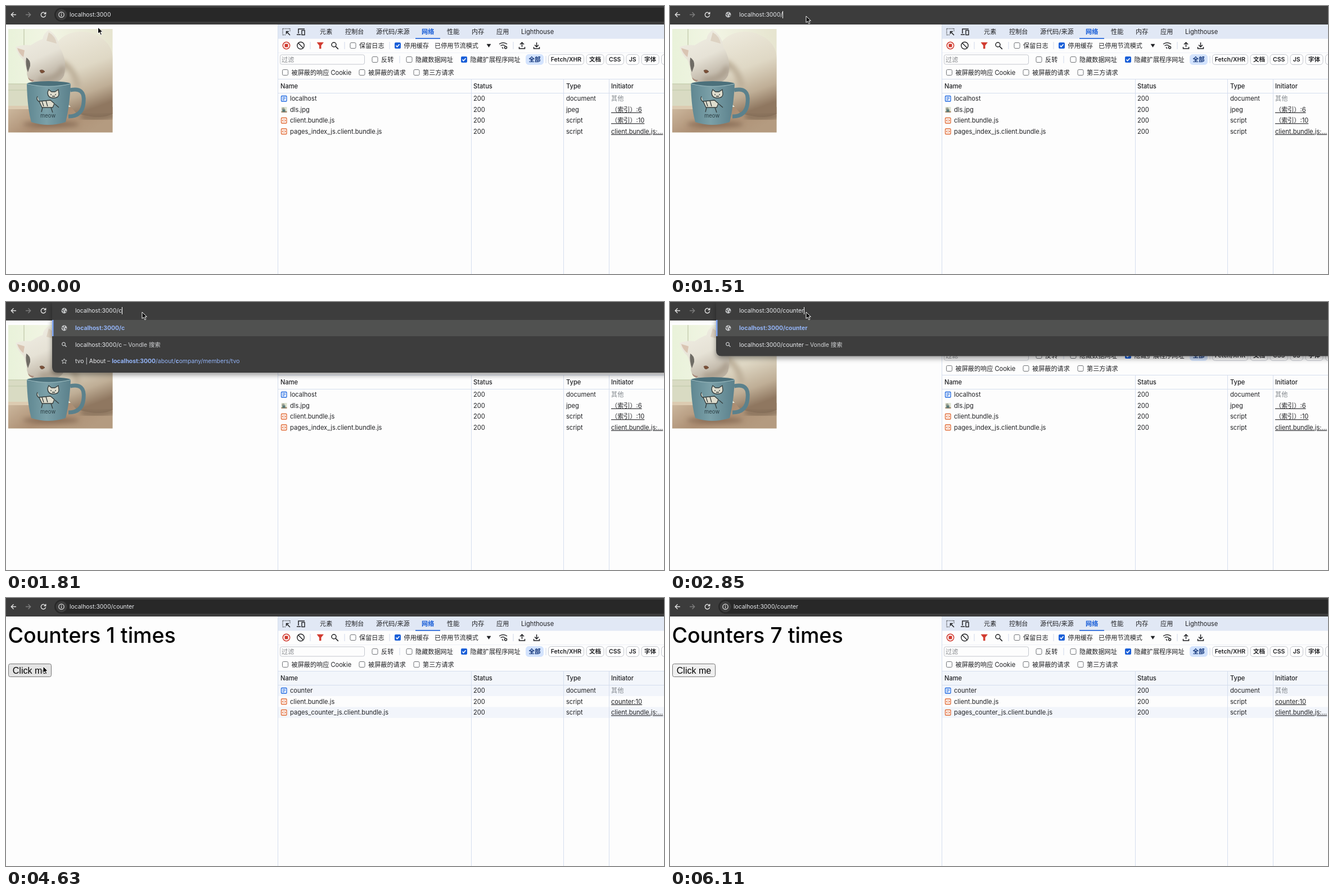
An HTML page for the animation above (6.69 s loop, 1170 px wide and 478 px high).

```html
<!DOCTYPE html>
<html lang="zh-CN">
<head>
<meta charset="utf-8">
<title>Counter page demo</title>
<style>
html, body { margin: 0; width: 100%; height: 100%; overflow: hidden; background: #fdfdfd; }
svg { display: block; width: 100%; height: 100%; }
text { font-family: Inter, "Noto Sans CJK SC", "Noto Sans CJK", "Noto Sans CJK JP", sans-serif; white-space: pre; }
</style>
</head>
<body>
<svg id="stage" viewBox="0 0 1170 478">
  <defs>
    <filter id="shadow" x="-5%" y="-20%" width="110%" height="150%">
      <feDropShadow dx="0" dy="4" stdDeviation="5" flood-opacity=".4"/>
    </filter>
    <filter id="soft" x="-50%" y="-50%" width="200%" height="200%"><feGaussianBlur stdDeviation="4"/></filter>
    <linearGradient id="wall"><stop stop-color="#e9f2da"/><stop offset=".4" stop-color="#f2f5e4"/><stop offset="1" stop-color="#e6e4cf"/></linearGradient>
    <linearGradient id="fur" x2=".25" y2="1"><stop stop-color="#efecdf"/><stop offset=".5" stop-color="#dfd8c5"/><stop offset=".8" stop-color="#bfae96"/><stop offset="1" stop-color="#8f7760"/></linearGradient>
    <linearGradient id="face" x2=".4" y2="1"><stop stop-color="#f2f0e6"/><stop offset=".6" stop-color="#e6e2d6"/><stop offset="1" stop-color="#bdb3a4"/></linearGradient>
    <linearGradient id="table" x2="1" y2=".4"><stop stop-color="#cdb99f"/><stop offset=".5" stop-color="#ab8d72"/><stop offset="1" stop-color="#b49b80"/></linearGradient>
    <linearGradient id="mug"><stop stop-color="#5f8791"/><stop offset=".45" stop-color="#7ba0a8"/><stop offset="1" stop-color="#5a808b"/></linearGradient>
    <clipPath id="photoFrame"><rect x="4" y="41" width="185.5" height="184.5"/></clipPath>
  </defs>
  <g id="tools"></g>
  <g id="scene"></g>
</svg>
<script>
const LOOP = 6690, HOST = 'localhost:3000', UI_SIZE = 11.13;
const INK = '#202124', GREY = '#5f6368', BLUE = '#1a5fd8', RED = '#d13a2f', LINE = '#d5deee', LINK = '#93b4f7';
const byId = id => document.getElementById(id);

const rect = (x, y, w, h, fill, extra = '') =>
  `<rect x="${x}" y="${y}" width="${w}" height="${h}" fill="${fill}" ${extra}/>`;
const circle = (x, y, r, fill, extra = '') => `<circle cx="${x}" cy="${y}" r="${r}" fill="${fill}" ${extra}/>`;
const path = (d, stroke, width = 1.3, fill = 'none', extra = '') =>
  `<path d="${d}" stroke="${stroke}" stroke-width="${width}" fill="${fill}" ${extra}/>`;
const shape = (d, fill, extra) => path(d, 'none', 0, fill, extra);
const at = (x, y, content) => `<g transform="translate(${x} ${y})">${content}</g>`;
// Text is placed by its left edge and vertical centre.
const text = (x, cy, content, fill = INK, size = UI_SIZE, extra = '') =>
  `<text x="${x}" y="${cy + size * .365}" fill="${fill}" font-size="${size}" ${extra}>${content}</text>`;
const span = (content, fill, weight = 400) => `<tspan fill="${fill}" font-weight="${weight}">${content}</tspan>`;

function checkbox(x, y, label, checked) {
  const box = checked
    ? rect(x - 5.5, y - 5.5, 11, 11, BLUE, 'rx="2"') + path(`M${x - 3} ${y}l2 2.3 4-4.6`, '#fff', 1.5)
    : rect(x - 5, y - 5, 10, 10, '#fff', 'rx="2" stroke="#6f7276"');
  return box + text(x + 11, y, label);
}

function chip(x, width, label, active) {
  return rect(x, 86.5, width, 18, active ? '#d3e3fd' : '#fdfdfd', `rx="5" stroke="${active ? '#d3e3fd' : '#c4c7ce'}"`) +
    text(x + width / 2, 95.5, label, active ? '#0b2f75' : INK, 10.5, 'font-weight="600" text-anchor="middle"');
}

function toolbarIcons() {
  const separators = [[541, 70], [602, 70], [682, 70], [902, 70], [700, 95], [960, 95]]
    .map(([x, y]) => path(`M${x} ${y - 6}v13`, '#cfd8ea', 1)).join('');
  return separators +
    // inspect and device mode
    path('M492 40.5h13M492 40.5v11M505 40v5M492 51.5h5', GREY, 1.4, 'none', 'stroke-dasharray="2 1.3"') +
    path('M505 52l-6-6M498.5 50v-4.5h4.5', INK, 1.5) +
    path('M520 49v-8h11M517 51h7', INK, 1.5) + rect(526, 43.5, 5, 8, 'none', `stroke="${INK}" stroke-width="1.4"`) +
    // record, clear, filter, search
    circle(498.5, 70.5, 6.2, 'none', `stroke="${RED}" stroke-width="1.5"`) + rect(495.5, 67.5, 6, 6, RED, 'rx="1"') +
    circle(524, 70.5, 6.2, 'none', `stroke="${INK}" stroke-width="1.4"`) + path('M519.8 66.3l8.5 8.5', INK, 1.4) +
    path('M553 65h11.5l-4.3 5.6v5.4h-3v-5.4z', RED, .5, RED) +
    circle(583, 69, 4, 'none', `stroke="${INK}" stroke-width="1.5"`) + path('M586 72l4.8 4.8', INK, 1.7) +
    // throttling menu, network conditions, import, export
    path('M855 68h7l-3.5 5.5z', INK, .5, INK) +
    path('M877 68q7-5 14 0M879.5 71q4-3 8 0M882 73.5l2 2.5', INK, 1.4) + circle(888.5, 74, 2, 'none', `stroke="${INK}" stroke-width="1.5"`) +
    path('M917.5 73v-8M914 68.5l3.5-3.5 3.5 3.5M912.5 73v3h10v-3', INK, 1.5) +
    path('M943.5 65v8M940 69.5l3.5 3.5 3.5-3.5M938.5 73v3h10v-3', INK, 1.5);
}

function devtools() {
  const tabs = [[558, '元素'], [603, '控制台'], [658, '源代码/来源'], [784, '性能'], [828, '内存'], [872, '应用'], [916, 'Lighthouse']];
  return rect(483, 33, 687, 445, '#fdfdfd') + rect(484, 33, 686, 25.5, '#e1e8f5') +
    tabs.map(([x, label]) => text(x, 45.5, label)).join('') +
    text(739, 45.5, '网络', BLUE, UI_SIZE, 'font-weight="600"') + rect(728, 57, 44, 1.6, BLUE) +
    path('M484 83.5h686', '#eef1f7', 1) + toolbarIcons() +
    checkbox(617, 70.5, '保留日志') + checkbox(696.5, 70.5, '停用缓存', true) + text(762, 70.5, '已停用节流模式') +
    rect(487.5, 87, 150, 17, '#fdfdfd', 'rx="3" stroke="#c4c7ce"') + text(490, 96, '过滤', '#85888c') +
    checkbox(656, 95.5, '反转') + checkbox(717, 95.5, '隐藏数据网址') + checkbox(814.5, 95.5, '隐藏扩展程序网址', true) +
    chip(924.5, 31, '全部', true) + chip(964.5, 63, 'Fetch/XHR') + chip(1032, 31, '文档') +
    chip(1067, 31.5, 'CSS') + chip(1103, 22.5, 'JS') + chip(1130, 31, '字体') + chip(1165.5, 30, '') +
    checkbox(496.5, 118.5, '被屏蔽的响应 Cookie') + checkbox(633, 118.5, '被屏蔽的请求') + checkbox(730, 118.5, '第三方请求');
}

const fileIcons = {
  document: rect(.5, .5, 9.5, 9.5, '#fff', 'rx="1" stroke="#1a66e0" stroke-width="1.3"') + path('M2.5 3.2h5.5M2.5 5.3h5.5M2.5 7.4h3.5', '#1a66e0', 1),
  script: rect(.5, .5, 9.5, 9.5, '#fff', 'rx="1" stroke="#e0662f" stroke-width="1.3"') + path('M4.4 3.4l-1.8 1.9 1.8 1.9M6.2 3.4l1.8 1.9-1.8 1.9', '#e0662f', 1.1),
  jpeg: rect(.5, .5, 10, 10, '#dde3d0') + rect(.5, 8, 10, 2.5, '#a58a6e') + circle(4, 4, 2.6, '#a2a498') + rect(2.5, 5, 5, 4.5, '#587a78'),
};

const OTHER = '其他', PENDING = '（待处理）';
const homeFiles = [
  ['localhost', '200', 'document', OTHER],
  ['dls.jpg', '200', 'jpeg', '（索引）:6'],
  ['client.bundle.js', '200', 'script', '（索引）:10'],
  ['pages_index_js.client.bundle.js', '200', 'script', 'client.bundle.js:…'],
];
const counterFiles = [
  ['counter', '200', 'document', OTHER],
  ['client.bundle.js', '200', 'script', 'counter:10'],
  ['pages_counter_js.client.bundle.js', '200', 'script', 'client.bundle.js:…'],
];
const pendingFiles = [counterFiles[0], ['client.bundle.js', PENDING, 'script', 'counter:10']];

function requests(files) {
  const striped = files !== homeFiles;
  const rows = files.map(([name, status, type, initiator], i) => {
    const y = 165.2 + i * 19.5;
    return (striped && i % 2 === 0 ? rect(484, y - 9.8, 686, 19.5, '#f2f5fb') : '') +
      at(489, y - 5.2, fileIcons[type]) + text(505, y, name) +
      text(831, y, status, status === PENDING ? '#80868b' : INK) + text(996, y, type) +
      text(1076, y, initiator, initiator === OTHER ? '#80868b' : INK, UI_SIZE, initiator === OTHER ? '' : 'text-decoration="underline"');
  }).join('');
  const titles = [[488, 'Name'], [831, 'Status'], [996, 'Type'], [1076, 'Initiator']];
  return (striped ? rect(484, 130, 686, 25, '#f3f6fb') : '') + rows +
    titles.map(([x, label]) => text(x, 142.5, label, INK, UI_SIZE, 'font-weight="500"')).join('') +
    path('M484 130.5h686M484 155.5h686M483.5 33v445M827.5 130v348M991.5 130v348M1072.5 130v348', LINE, 1);
}

const SOFT = 'filter="url(#soft)"';
const photo = `<g clip-path="url(#photoFrame)">` +
  // window, shelf and table
  rect(4, 41, 186, 185, 'url(#wall)') + rect(4, 139, 50, 46, '#d9dbc3') +
  path('M4 139h40M4 150h40M32 41v30', '#c9cfb2', 1.5) +
  rect(4, 180, 186, 47, 'url(#table)') + rect(4, 178, 40, 6, '#dccbb1') +
  // body and its shading
  shape('M92 64C104 48 128 42 150 48C176 56 190 72 190 96V192C172 203 140 197 124 190L88 150z', 'url(#fur)') +
  path('M98 100Q122 112 128 146', '#bcae98', 10, 'none', SOFT) +
  path('M134 196Q160 204 194 194', '#806a54', 8, 'none', SOFT) +
  // head, ears, patch, nose and eye
  shape('M17 73Q30 68 44 70Q56 62 65 59Q67 48 76 43Q92 52 95 73Q110 98 103 124Q96 139 70 139L46 135Q36 128 37 117Q34 102 31 96Q21 88 17 73z', 'url(#face)') +
  path('M60 131Q92 134 102 108', '#a89b8a', 8, 'none', SOFT) +
  shape('M20 75l13 4-2 12q-8-6-11-16z', '#d9c4b2') + shape('M76 47q12 7 14 20l-18-5z', '#ddd2c2') +
  shape('M36 92q8 4 7 15l-4 11q-5-13-3-26z', '#6f6c65') +
  shape('M39 127q4 5 11 5l-3 3q-7-2-8-8z', '#ab8b7c') +
  path('M60 115q5-3 9 2-4 4-7 2z', '#73584a', 1, '#7b4f35') +
  // mug
  `<ellipse cx="80" cy="211" rx="50" ry="5" fill="#6e5340" opacity=".6" ${SOFT}/>` +
  path('M114 150Q141 144 138 172Q136 197 111 197', '#5b818c', 7) +
  shape('M37 139Q38 183 45 207Q75 217 106 207Q113 180 115 139z', 'url(#mug)') +
  `<ellipse cx="76" cy="139" rx="39" ry="5" fill="#4b707b"/>` + path('M37 139q39 9 78 0', '#8fb0b6', 1.5) +
  path('M74 154l2-5 5 4h6l6-4 1 8q0 7-10 7-10 0-10-10zM59 170l20-2 7 6-3 7H64zM59 171q-6-4-3-10M65 181l-2 8M80 181l3 9M87 175l7 6', '#343c3c', 1.3, '#dedccd') +
  path('M64 170l3 9M71 169l3 10M80 157v2M88 157v2M82 161h5', '#343c3c', 1.3) +
  text(61, 196, 'meow', '#2d4046', 9.5) + '</g>';

const counterPage = (count, hover) =>
  text(3.5, 66.7, `Counters ${count} times`, '#000', 37.6, 'font-weight="500"') +
  rect(4.5, 117.5, 76, 23, hover ? '#e3e3e3' : '#efefef', 'rx="3" stroke="#767676"') +
  text(11.8, 129, 'Click me', '#000', 16, `style="font-family:'Liberation Sans',Arial,sans-serif"`);

const icons = {
  globe: circle(0, 0, 4.9, '#c7c9cb') + path('M-4-1.5l2.5 2.5v2M0.5-4v2l-2 1M1 .5l2.5.5-1 2', '#3c3c3c', 1.1),
  search: circle(-1, -1, 2.8, 'none', 'stroke="#c7c9cb" stroke-width="1.2"') + path('M1 1l3 3', '#c7c9cb', 1.3),
  star: path('M0-4.5l1.3 3 3.3.3-2.5 2.2.8 3.2L0 2.5l-2.9 1.7.8-3.2-2.5-2.2 3.3-.3z', '#d0d2d4', 1),
};
const bookmarks = [
  ['tvo | About', '/about/company/members/tvo'], ['Members', '/about/company/members'],
  ['Company', '/about/company'], ['About', '/about'], ['Counter', '/counter'],
];

function suggestions(url, count) {
  const query = url.slice(HOST.length + 1), bottom = 37.5 + 29.5 * count;
  const dash = span(' – ', '#d0d2d4');
  const entries = [
    ['globe', span(url, LINK, 700)],
    ['search', url + span(' – Vondle 搜索', '#d0d2d4')],
    ...bookmarks.map(([title, page]) => ['star', title + dash + span(HOST, LINK, 700) +
      span(query ? page.replace('/' + query, '/' + span(query, LINK, 700)) : page, LINK)]),
  ].slice(0, count);
  return `<path d="M82 0H1180V${bottom}H92Q82 ${bottom} 82 ${bottom - 10}z" fill="#3c3c3c" filter="url(#shadow)"/>` +
    rect(82, 32, 1088, 29, '#505150') + rect(82, 32, 2.5, 29, '#7da5f5') +
    entries.map(([icon, label], i) => at(103.5, 46.5 + 29.5 * i, icons[icon]) + text(123, 46.5 + 29.5 * i, label, '#e8eaed', 10.4)).join('');
}

function browserBar({ mode, url, caret, loading, rows }) {
  const typing = mode === 'typing', textX = typing ? 123 : 113;
  let bar = rect(0, 0, 1170, 33, '#3c3c3c');
  if (rows) bar += suggestions(url, rows);
  bar += path('M18 15.5h-8.5M13.5 11.3l-4.2 4.2 4.2 4.2', '#e3e3e3', 1.4) +
    path('M35 15.5h8.5M39.5 11.3l4.2 4.2-4.2 4.2', '#7d7d7d', 1.4) +
    (loading ? path('M63.5 12l7 7M70.5 12l-7 7', '#e3e3e3', 1.4)
      : path('M70 13.2a4.2 4.2 0 1 0 .6 3.2M70.7 10.8v3.2h-3.2', '#e3e3e3', 1.4));
  if (typing) bar += at(103.5, 15.5, icons.globe);
  else {
    const ring = mode === 'idle' ? '' : 'stroke="#a8c7fa" stroke-width="2"';
    bar += rect(86, 3, 1120, 25, '#282828', `rx="12.5" ${ring}`) + circle(98.5, 15.5, 10, '#3c3c3c') +
      circle(98.5, 15.5, 4.7, 'none', 'stroke="#e3e3e3" stroke-width="1.2"') + path('M98.5 14.8v3.2M98.5 12.7v1.2', '#e3e3e3', 1.2);
  }
  if (mode === 'selected') bar += rect(textX, 9, 74, 13, '#3f638b');
  return bar + text(textX, 15.5, url, '#e8eaed', 10.4, 'id="address"') +
    (caret ? '<path id="caret" stroke="#fff"/>' : '');
}

const arrow = path('M0 0V11.5L2.7 9 4.8 13.7 6.8 12.8 4.8 8.3H8.4z', '#fff', 1, '#000');
const beamOutline = 'M-2.5-5.5Q0-5.5 0-4Q0-5.5 2.5-5.5M0-4V4M-2.5 5.5Q0 5.5 0 4Q0 5.5 2.5 5.5M-1.5 2h3';
const beam = path(beamOutline, '#eee', 2.6) + path(beamOutline, '#111', 1);

// Each step changes part of the state from its time on.
const typed = (part, rows) => ({ mode: 'typing', caret: true, url: `${HOST}/${part}`, rows });
const move = (x, y, pointer = arrow) => ({ mouse: [x, y], pointer });
const steps = [
  [0, { mode: 'idle', url: HOST, files: homeFiles, count: null, ...move(163.5, 38) }],
  [180, move(184, 36)],
  [330, move(225, 23, beam)],
  [470, move(242, 19, beam)],
  [620, { mode: 'selected' }],
  [770, { mode: 'focus', caret: true }],
  [1210, { caret: false }],
  [1510, { ...typed('', 0), ...move(242, 18) }],
  [1660, typed('', 7)],
  [1810, typed('c', 3)],
  [1950, typed('co', 3)],
  [2100, typed('cou', 2)],
  [2550, typed('coun', 2)],
  [2700, typed('counte', 2)],
  [2850, typed('counter', 2)],
  [3140, { mode: 'idle', caret: false, rows: 0, loading: true, ...move(242, 19, beam) }],
  [3290, { count: 0, files: pendingFiles }],
  [3440, { files: counterFiles, loading: false }],
  [4040, move(216, 42)],
  [4190, move(142, 88)],
  [4340, move(84, 116)],
  [4480, { ...move(66, 122), hover: true }],
  [4630, { count: 1 }],
  [4780, { count: 2 }],
  [4930, { count: 3 }],
  [5080, { count: 4 }],
  [5230, { count: 5 }],
  [5380, { count: 6 }],
  [5530, { count: 7 }],
  [5670, { ...move(704, 233), hover: false }],
  [5820, move(692, 431)],
  [5960, move(1079, 445)],
  [6110, { mouse: null }],
];

function draw(state) {
  byId('scene').innerHTML = requests(state.files) +
    (state.count === null ? photo : counterPage(state.count, state.hover)) +
    browserBar(state) + (state.mouse ? at(...state.mouse, state.pointer) : '');
  const caret = byId('caret');
  if (caret) {
    const address = byId('address');
    const x = Math.round(+address.getAttribute('x') + address.getComputedTextLength()) + .5;
    caret.setAttribute('d', `M${x} 9v13`);
  }
}

byId('tools').innerHTML = devtools();
let shown = 0;
function tick() {
  const time = performance.now() % LOOP;
  const past = steps.filter(([start]) => start <= time);
  if (past.length !== shown) {
    shown = past.length;
    draw(Object.assign({}, ...past.map(([, change]) => change)));
  }
  requestAnimationFrame(tick);
}
tick();
</script>
</body>
</html>
```
